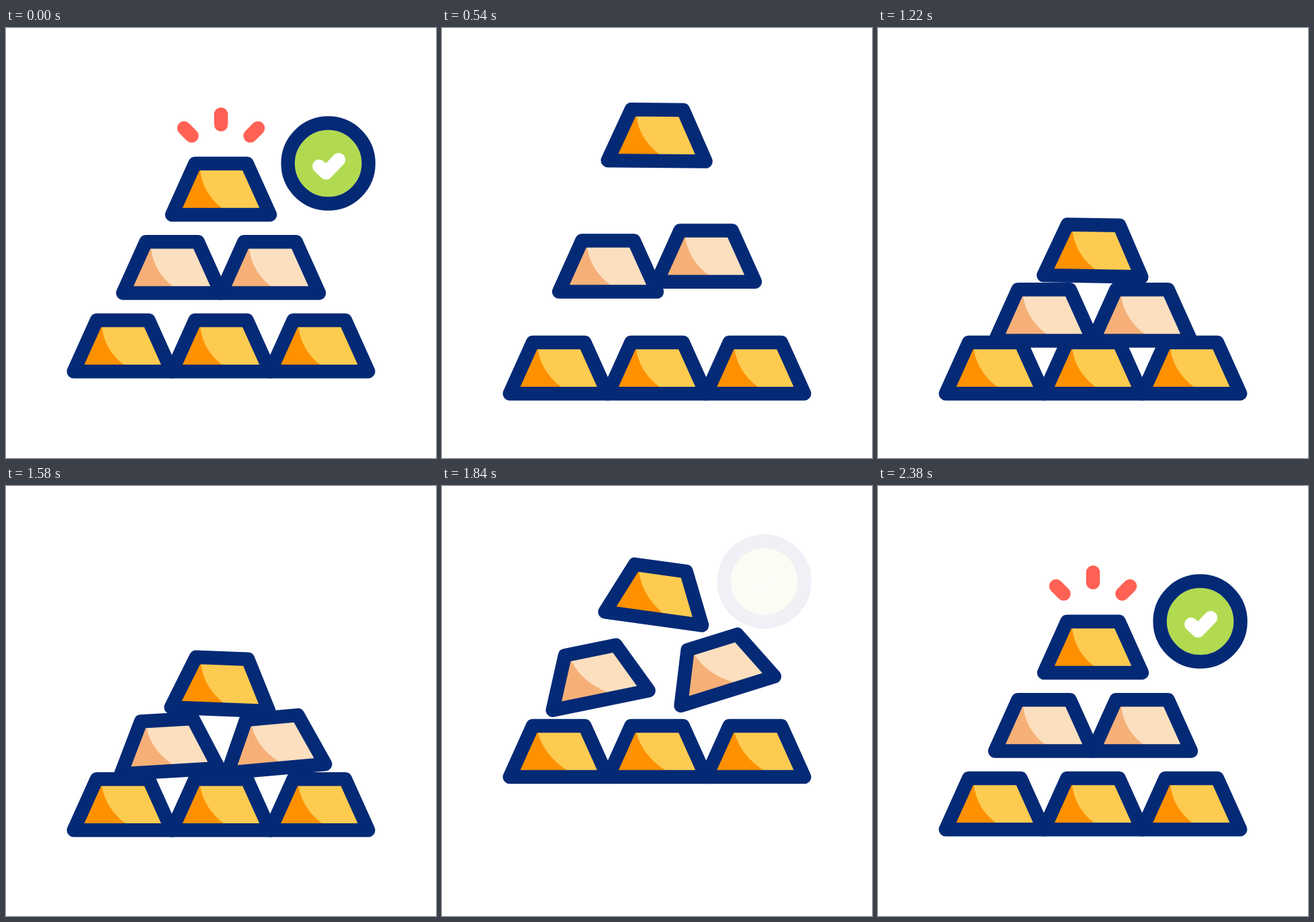
Write an HTML page with a canvas that moves like this. It is 640x640 px and loops after 2.4 s.

```html
<!DOCTYPE html>
<html lang="en">
<head>
<meta charset="utf-8">
<title>Stacked bars</title>
<style>
  html, body { margin: 0; width: 100%; height: 100%; overflow: hidden; background: #fff; }
  canvas { display: block; width: 640px; height: 640px; }
</style>
</head>
<body>
<canvas id="stage" width="640" height="640"></canvas>
<script>
const ctx = document.getElementById('stage').getContext('2d');
const LOOP = 2400;
const LINE = 20.5;
const NAVY = '#042a76', GREEN = '#b1da50', RED = '#ff6155';
const GOLD = ['#fdcb50', '#ff9100'];
const PALE = ['#fcdfbf', '#f6b077'];

const clamp = u => Math.min(1, Math.max(0, u));
const smooth = u => u * u * (3 - 2 * u);
const linear = u => u;

// Value of a track of [time, value] keys at time t
function track(t, keys, ease = smooth) {
  if (t <= keys[0][0]) return keys[0][1];
  for (let i = 1; i < keys.length; i++) {
    const [t0, a] = keys[i - 1], [t1, b] = keys[i];
    if (t < t1) return a + (b - a) * ease((t - t0) / (t1 - t0));
  }
  return keys[keys.length - 1][1];
}

// Every bar leaps from the squeezed stack and settles in its place
const leap = (low, peak) => [[1480, low], [1775, peak], [2172, 0]];

const BASE_Y = [[100, 0], [500, 33], ...leap(33, -84.3)];
const ROWS = {
  base: { y: BASE_Y, x: leap(0, 0), turn: leap(0, 0) },
  left: {
    y: [[100, 0], [350, -24], [960, 71], ...leap(71, -80.5)],
    x: leap(0, -20), turn: leap(0, -12.5)
  },
  right: {
    y: [[100, 0], [400, -26], [1140, 71], ...leap(71, -94.5)],
    x: leap(0, 22.5), turn: leap(0, -18.7)
  },
  top: {
    y: [[100, 0], [520, -80], [900, -81], [1290, 107], ...leap(107, -86.5)],
    x: leap(0, 0), turn: [[480, 0], [920, 11], [1290, 0], ...leap(0, 8.5)]
  }
};
const BARS = [
  [173.7, 473, GOLD, ROWS.base],
  [320, 473, GOLD, ROWS.base],
  [466.3, 473, GOLD, ROWS.base],
  [247, 356.3, PALE, ROWS.left],
  [393, 356.3, PALE, ROWS.right],
  [320, 239.7, GOLD, ROWS.top]
];
const SHADE = [[100, 1], [500, 3.5], [1500, 3.5], [2010, 15], [2380, 1]];

const SPARKS = [
  [276.5, 160.5, 265, 149],
  [320, 143.7, 320, 128.5],
  [363.5, 160.5, 375, 149]
];

function strokeLine(points, color, width) {
  ctx.beginPath();
  points.forEach(([x, y]) => ctx.lineTo(x, y));
  ctx.strokeStyle = color;
  ctx.lineWidth = width;
  ctx.stroke();
}

function drawBar(t, [x, y, [light, dark], move]) {
  const end = track(t, SHADE);
  ctx.save();
  ctx.translate(x + track(t, move.x), y + track(t, move.y));
  ctx.rotate(track(t, move.turn) * Math.PI / 180);

  const outline = new Path2D('M-73 38.2L-38.7-38H38.7L73 38.2Z');
  ctx.fillStyle = light;
  ctx.fill(outline);

  ctx.beginPath();
  ctx.moveTo(-73, 38.2);
  ctx.lineTo(-38.7, -38);
  ctx.lineTo(-31, -28);
  ctx.quadraticCurveTo(-27.5 + end * 0.5, 6, end, 28);
  ctx.lineTo(end + 8, 38.2);
  ctx.fillStyle = dark;
  ctx.fill();

  ctx.strokeStyle = NAVY;
  ctx.lineWidth = LINE;
  ctx.stroke(outline);
  ctx.restore();
}

function drawBadge(t) {
  const leaving = clamp((t - 80) / 340);
  const entering = clamp((t - 1820) / 340);
  const back = t >= 1820;
  const alpha = back ? entering : 1 - leaving;
  if (alpha <= 0) return;
  const out = smooth(leaving);

  ctx.save();
  ctx.globalAlpha = alpha;
  ctx.translate(
    479.6 + (back ? 0 : 40 * out),
    201.6 - (back ? 65 * Math.pow(1 - entering, 1.4) : 80 * out)
  );
  ctx.fillStyle = GREEN;
  ctx.beginPath();
  ctx.arc(0, 0, 50, 0, Math.PI * 2);
  ctx.fill();
  ctx.strokeStyle = NAVY;
  ctx.lineWidth = LINE;
  ctx.beginPath();
  ctx.arc(0, 0, 60, 0, Math.PI * 2);
  ctx.stroke();
  strokeLine([[-13.6, 4.2], [-3.2, 14], [15.6, -5.6]], '#fff', 20);
  ctx.restore();
}

function drawSparks(t) {
  const size = track(t, [[80, 1], [320, 0], [2080, 0], [2370, 1]]);
  if (size <= 0) return;
  for (const [x0, y0, x1, y1] of SPARKS) {
    const tip = [x0 + (x1 - x0) * size, y0 + (y1 - y0) * size];
    strokeLine([[x0, y0], tip], RED, LINE * track(size, [[0, 0], [0.4, 1]], linear));
  }
}

function draw(now) {
  const t = now % LOOP;
  ctx.fillStyle = '#fff';
  ctx.fillRect(0, 0, 640, 640);
  ctx.lineCap = ctx.lineJoin = 'round';
  BARS.forEach(bar => drawBar(t, bar));
  drawSparks(t);
  drawBadge(t);
}

const start = performance.now();
function tick() {
  draw(performance.now() - start);
  requestAnimationFrame(tick);
}
tick();
</script>
</body>
</html>
```
